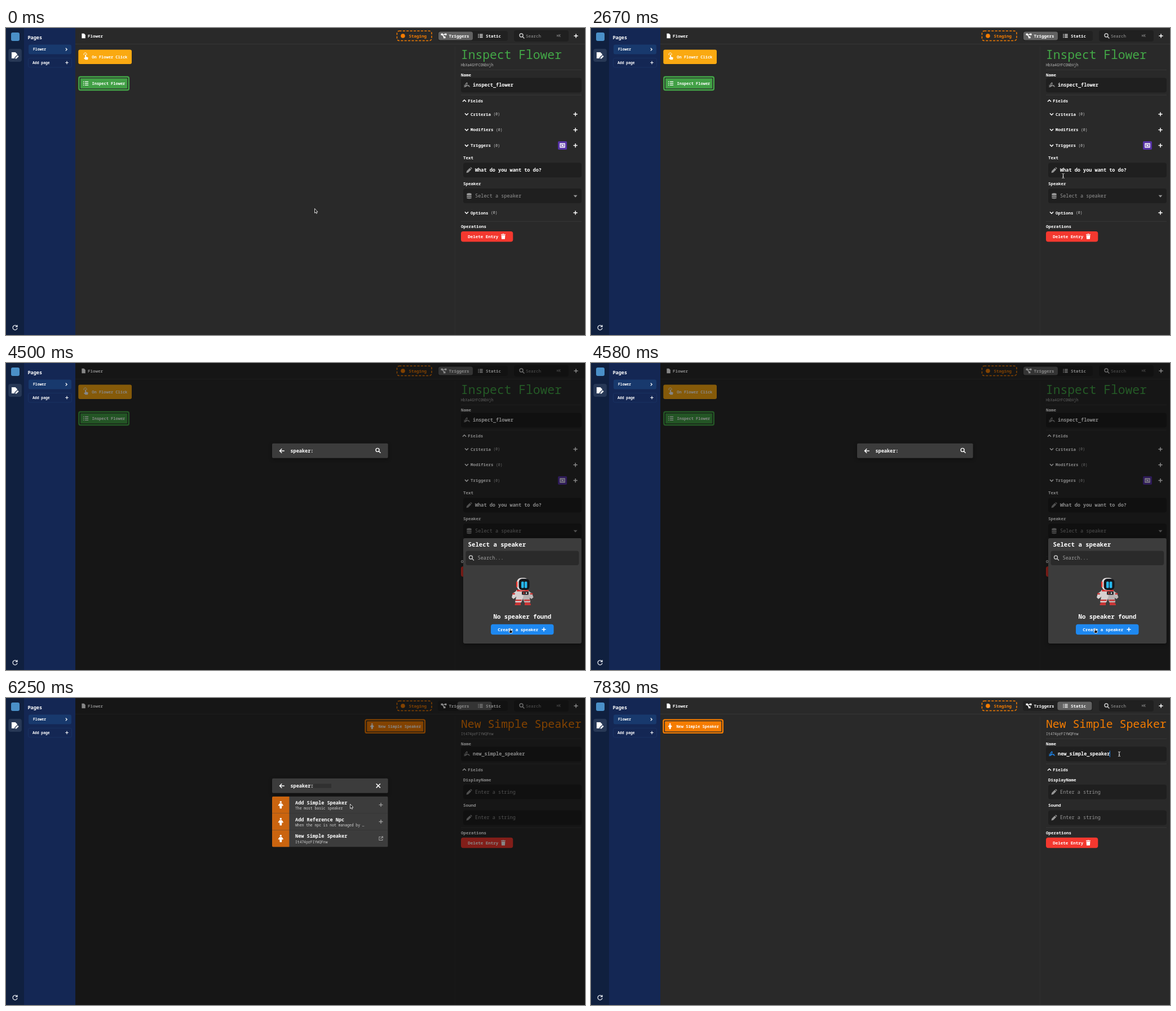
These frames come from a looping animation (1027 px wide and 545 px high, 8 s). An HTML page:

```html
<!DOCTYPE html>
<html lang="en">
<head>
<meta charset="utf-8">
<title>Entry editor</title>
<style>
html, body { margin: 0; width: 100%; height: 100%; overflow: hidden; background: #292929; }
svg { display: block; width: 100vw; height: 100vh; }
text { font-family: 'Noto Sans Mono', 'DejaVu Sans Mono', monospace; white-space: pre; }
.raised { filter: drop-shadow(0 2px 3px rgba(0,0,0,.4)); }
</style>
</head>
<body>
<svg id="stage" viewBox="0 0 1027 545" xmlns="http://www.w3.org/2000/svg"></svg>
<script>
const LOOP = 8000;
const WHITE = '#fff', GREY = '#969696', GREEN = '#43a847', ORANGE = '#f57c00',
      BLUE = '#1e88f0', RED = '#f4382f', FIELD = '#1f1f1f', RAISED = '#3c3c3c';

// Drawing helpers
const rect = (x, y, w, h, fill, r = 0, extra = '') =>
  `<rect x="${x}" y="${y}" width="${w}" height="${h}" rx="${r}" fill="${fill}" ${extra}/>`;
const circle = (x, y, r, fill) => `<circle cx="${x}" cy="${y}" r="${r}" fill="${fill}"/>`;
const shape = (d, fill) => `<path d="${d}" fill="${fill}"/>`;
const text = (s, x, y, size = 7.5, fill = WHITE, weight = 600) =>
  `<text x="${x}" y="${y}" font-size="${size}" fill="${fill}" font-weight="${weight}">${s}</text>`;
const group = (id, body, extra = '') => `<g id="${id}" ${extra}>${body}</g>`;
const rule = (y, x1 = 807, x2 = 1021) =>
  `<path d="M${x1} ${y}H${x2}" stroke="#3b3b3b" stroke-width=".8"/>`;

// Icons are centred on 0,0; numbers are stroke widths, 0 means filled
const ICONS = {
  plus: ['M-3.6 0H3.6M0-3.6V3.6', 1.5],
  right: ['M-1.2-2.4L1.2 0-1.2 2.4', 1.3],
  down: ['M-3-1.5L0 1.5 3-1.5', 1.5],
  up: ['M-3 1.5L0-1.5 3 1.5', 1.5],
  caret: ['M-3.4-1.7H3.4L0 2.2z', 0],
  list: ['M-4.6-3h1.6M-4.6 0h1.6M-4.6 3h1.6M-1.5-3H4.6M-1.5 0H4.6M-1.5 3H4.6', 1.4],
  search: ['M2-1A3 3 0 1 1-4-1 3 3 0 1 1 2-1M1.2 1.2L4.4 4.4', 1.4],
  close: ['M-3.6-3.6L3.6 3.6M3.6-3.6L-3.6 3.6', 1.5],
  back: ['M4.2 0H-4M-.3-3.8L-4.1 0-.3 3.8', 1.5],
  open: ['M-.5-3H-3.3V3.3H3V.5M.8-3.6H3.6V-.8M3.6-3.6L-.6.6', 1.1],
  refresh: ['M3.4-2A4 4 0 1 0 4 1M4-4.4V-1.3H.8', 1.3],
  squiggle: ['M-5.3 2.8Q-1 4 .2-1.5T-2.4-2Q-3 2.2.8 1T3.2.6 5.3 2.7M-5-.2L-2.8 2', 1.2],
  flow: ['M-5-4.3h3.6v1.2H1.4v-1.2H5v3.4H1.4v-1H-1.1L1 1h2v3.3H-.6V1.7L-2.7-.9H-5z', 0],
  file: ['M-3.2-4.2H.7L3.2-1.7V4.2H-3.2z', 0],
  edit: ['M-5.5-5H.5L3.5-2V-.6L-.8 3.6V5.2H-5.5zM.5 3.9L4.3.1 6 1.8 2.2 5.5H.5z', 0],
  trash: ['M-4.2-4.3H-1.6L-1-5H1L1.6-4.3H4.2V-3H-4.2zM-3.6-2.2H3.6L3.1 5H-3.1z', 0],
  pencil: ['M-5 5L-4.2 1.5 1-3.7 3.7-1-1.5 4.2zM1.8-4.4L2.6-5Q3.4-5.4 5 -3.4 5.4-2.6 4.4-1.8z', 0],
  db: ['M-4.2-3.2A4.2 1.8 0 0 1 4.2-3.2V-1.9A4.2 1.5 0 0 1-4.2-1.9zM-4.2-.9A4.2 1.5 0 0 0 4.2-.9V1.1A4.2 1.5 0 0 1-4.2 1.1zM-4.2 2.1A4.2 1.5 0 0 0 4.2 2.1V3.6A4.2 1.6 0 0 1-4.2 3.6z', 0],
  person: ['M-1.4-4.1a1.4 1.4 0 1 1 2.8 0 1.4 1.4 0 1 1-2.8 0M-1.6-2.3H1.6L3.8.8 2.7 1.6 1.8.7 1.3 5.2H-1.3L-1.8.7-2.7 1.6-3.8.8z', 0],
  touch: ['M-1.3 1V-3.4a.9.9 0 0 1 1.8 0V-.4L3.6.4Q4.4.7 4.2 1.6L3.5 4.8H-.8L-3.6 2 -3 1.4z', 0],
  ring: ['M-2.7-1.4A2.6 2.6 0 1 1 1.9-1.4', 1],
  image: ['M-4-3.2H4V3.2H-4zM-2.4-1.2H-.4M.4 1.2H2.4M-2 1.6L2-1.6', 1.5]
};
const icon = (name, x, y, color = WHITE, scale = 1) => {
  const [d, w] = ICONS[name];
  const paint = w ? `fill="none" stroke="${color}" stroke-width="${w}"` : `fill="${color}"`;
  return `<path d="${d}" transform="translate(${x} ${y}) scale(${scale})" ${paint}/>`;
};

// Repeated interface parts
const input = (x, y, glyph, value, color, weight, glyphColor = GREY) =>
  rect(x, y, 1021 - x, 26, FIELD, 4) + icon(glyph, x + 10.5, y + 13, glyphColor) +
  text(value, x + 21, y + 15.8, 8.55, color, weight);
const foldRow = (name, y) =>
  icon('down', 817, y) + text(name, 824, y + 2.6) +
  text('(0)', 824 + name.length * 4.5 + 4.5, y + 2.4, 6.4, '#c4c4c4', 400) + icon('plus', 1010, y);
const remove = y =>
  text('Operations', 807, y) + rect(807, y + 6, 92.3, 18.4, RED, 4) +
  text('Delete Entry', 819.3, y + 17.8) + icon('trash', 882, y + 15.1, WHITE, .95);
const heading = (name, size, id, color, y) =>
  text(name, 807, y, size, color, 400) + text(id, 807, y + 12.8, 6.4, '#bbb', 400) + rule(y + 19.3) +
  text('Name', 807, y + 31) + icon('up', 813, y + 74.3) + text('Fields', 819.3, y + 76.9) + rule(y + 64);
const selected = (x, y, w, color, inner) =>
  rect(x + 1.2, y + 1.2, w - 2.4, 23.3, 'none', 2.5, `stroke="${color}" stroke-width="2.4"`) +
  rect(x + 3.8, y + 3.8, w - 7.6, 18.2, inner, 1);
const result = (y, title, note, action) =>
  rect(472, y, 205.6, 30, RAISED) + rect(472, y, 30.4, 30, '#ca640f') +
  icon('person', 487.3, y + 15, WHITE, 1.25) + text(title, 513, y + 13.8, 8.55) +
  text(note, 513, y + 23, 6.4, '#d0d0d0', 500) + icon(action, 665, y + 14.8, '#9d9d9d', .95);

const sidebar =
  rect(0, 0, 32, 545, '#10203f') + rect(32, 0, 91, 545, '#142754') +
  rect(9, 8, 15, 15, '#4a90c8', 3) +
  rect(4.3, 37, 23.6, 23, '#273856', 4) + icon('edit', 16, 48.4, WHITE, 1.1) +
  icon('refresh', 16, 531.7, '#e4e8ef') +
  text('Pages', 38.4, 20.2, 8.55) +
  rect(40, 29.5, 76, 17, '#18396d', 3) + text('Flower', 48, 40.2, 6.4) + icon('right', 107, 38) +
  rect(39.5, 53.4, 77, 16.4, 'none', 3, 'stroke="#1c3566" stroke-width=".8"') +
  text('Add page', 47, 63.8, 6.4) + icon('plus', 108, 61.5, WHITE, .75);

const header =
  rule(28.5, 123, 1027) + '<path d="M796.5 33V545" stroke="#303030" stroke-width=".8"/>' +
  icon('file', 137.6, 14) + text('Flower', 145, 16.7) +
  rect(693.5, 5.3, 61.5, 17.2, 'none', 4, `stroke="${ORANGE}" stroke-width="1.5" stroke-dasharray="4 2.4"`) +
  circle(704, 14, 3.8, ORANGE) + text('Staging', 714.5, 16.7, 7.5, ORANGE) +
  rect(766, 5, 124, 18, '#212121', 4) + rect(767, 6.5, 61, 15, '#626262', 3.5, 'id="tab"') +
  icon('flow', 776.5, 14) + text('Triggers', 785.5, 16.7) +
  icon('list', 841.5, 14, WHITE, .9) + text('Static', 851, 16.7) +
  rect(901, 4, 97, 20, '#202020', 4) + icon('search', 915, 14, '#ccc') +
  text('Search', 922, 16.7, 7.5, '#9d9d9d', 400) + text('⌘K', 976.5, 16.3, 6.4, '#9d9d9d', 400) +
  icon('plus', 1011, 14);

const triggerNodes =
  rect(128.3, 38.5, 94.7, 25.6, '#faa911', 3) + icon('ring', 141, 49.3, WHITE) +
  icon('touch', 141.5, 51.5) + text('On Flower Click', 152.3, 54, 7) +
  selected(128.2, 85.5, 90.8, GREEN, '#42a046') + icon('list', 141.5, 98.4) +
  text('Inspect Flower', 152.5, 101, 7);
const staticNodes =
  selected(127.2, 37.4, 107.8, ORANGE, ORANGE) + icon('person', 140.2, 50.2, WHITE, .95) +
  text('New Simple Speaker', 151.4, 52.8, 7);

const triggerPanel =
  heading('Inspect Flower', 21.3, 'HbXa4GYFCONbVjh', GREEN, 55) +
  input(807, 88.5, 'squiggle', 'inspect_flower', WHITE, 600) +
  foldRow('Criteria', 153) + foldRow('Modifiers', 180.8) + foldRow('Triggers', 208.6) +
  rect(979, 201, 16, 15, '#5632a6', 2) + icon('image', 987, 208.5) +
  text('Text', 811, 233) + input(811, 239.2, 'pencil', 'What do you want to do?', WHITE, 600) +
  text('Speaker', 811, 278.8) + input(811, 285, 'db', 'Select a speaker', GREY, 400, 'currentColor') +
  icon('caret', 1010, 298.5, 'currentColor') + foldRow('Options', 328) + rule(343.3) + remove(355);
const staticPanel =
  heading('New Simple Speaker', 19.8, 'It474prFIYWQFnw', ORANGE, 53) +
  input(807, 86.5, 'squiggle', 'new_simple_speaker', WHITE, 600, 'currentColor') +
  rect(919.8, 93.6, 1, 11.4, BLUE, 0, 'id="insert"') +
  text('DisplayName', 811, 147.6) + input(811, 153.8, 'pencil', 'Enter a string', GREY, 400) +
  text('Sound', 811, 193.4) + input(811, 199.6, 'pencil', 'Enter a string', GREY, 400) +
  rule(230) + remove(241.8);

const robot =
  // arms, torso and legs
  shape('M906 404L899 409 897 416 900 419 904 416 907 411z', '#d9d3d3') +
  shape('M926 404L933 409 935.5 416 932 419 928 416 925 411z', '#bdb6b6') +
  rect(898, 408.5, 5, 2.4, '#c93636', 1) + rect(929.5, 408.5, 5, 2.4, '#c93636', 1) +
  shape('M905 403H927L928 415 930 425H919.5L917 418 914 425H903L905 415z', '#d6cfcf') +
  shape('M918 411H928L930 425H919.5L917 418z', '#b9b1b1') +
  shape('M904 420H915L914 422.4H903.4zM918.7 420H929L929.6 422.4H919z', '#c93636') +
  shape('M902.5 430Q902.5 425 907 425H913V430zM920 430V425H926Q931 425 931 430z', '#c93636') +
  // collar and chest
  rect(906, 402.5, 21, 3, '#d92f2f', 1) + rect(915, 405.5, 12, 6, '#26262a', 1) +
  circle(918.5, 408.5, 1.2, RED) + circle(923, 408.5, 1.2, WHITE) +
  // helmet
  rect(906, 381.5, 21, 22, '#e6e1e1', 8) + rect(905, 388, 2.4, 10, RED, 1) +
  rect(909.5, 383, 19, 20, '#15171c', 6) +
  rect(914, 388, 4.6, 11.5, '#25b7ef', 1.5) + rect(919.8, 388, 4.6, 11.5, '#25b7ef', 1.5);
const popup =
  rect(811, 311, 209.8, 187, RAISED, 3, 'class="raised"') +
  text('Select a speaker', 819.6, 326, 10.68) +
  rect(815.4, 333.6, 200.8, 25.4, '#2a2a2a', 4) + icon('search', 825.5, 346, '#c4c4c4') +
  text('Search...', 836.5, 349, 8.55, '#a0a0a0', 400) + robot +
  text('No speaker found', 864.6, 454, 10.68) +
  rect(860, 463.8, 111.5, 18.4, BLUE, 4) + text('Create a speaker', 872.3, 475.7) + icon('plus', 954, 473);

const dialog =
  rect(472, 142.8, 205.6, 26, RAISED, 2, 'class="raised"') + icon('back', 489.6, 156) +
  text('speaker:', 504.4, 158.8, 8.55) +
  group('lookup', icon('search', 660, 155.4)) +
  group('results',
    rect(545.5, 152.3, 31.5, 7.4, '#303030') + icon('close', 660.3, 155.8) +
    `<g clip-path="url(#rows)">` +
    result(174.8, 'Add Simple Speaker', 'The most basic speaker', 'plus') +
    result(204.7, 'Add Reference Npc', 'When the npc is not managed by …', 'plus') +
    group('created', result(234.6, 'New Simple Speaker', 'It474prFIYWQFnw', 'open')) + '</g>');

const outline = 'fill="#111" stroke="#fff" stroke-width=".8" stroke-linejoin="round"';
const cursor =
  `<path id="arrow" d="M0 0V8L1.8 6.4 3 9 4.3 8.4 3.1 5.9H5.4z" ${outline}/>` +
  `<path id="beam" d="M-2-4Q0-4 0-2.8 0-4 2-4M0-3V3M-2 4Q0 4 0 2.8 0 4 2 4M-1 .8H1" fill="none" stroke="#ddd" stroke-width="1"/>` +
  `<path id="hand" d="M-.8 0Q0-1 .8 0V3L3.4 3.7Q4.3 4 4.1 5L3.3 8H-.5L-2.8 4.7-2 4.2-.8 5.2z" ${outline}/>`;

const stage = document.getElementById('stage');
stage.innerHTML =
  `<defs><clipPath id="canvas"><rect x="123" y="29" width="673" height="516"/></clipPath>
   <clipPath id="rows"><rect id="rowsBox" x="472" y="174.8" width="205.6" height="89.8" rx="2.5"/></clipPath></defs>` +
  rect(0, 0, 1027, 545, '#292929') +
  `<g clip-path="url(#canvas)">${group('triggerNodes', triggerNodes)}${group('staticNodes', staticNodes)}</g>` +
  header + group('triggerPanel', triggerPanel) + group('staticPanel', staticPanel) +
  rect(123, 0, 904, 545, '#000', 0, 'id="shade"') +
  group('popup', popup) + group('dialog', dialog) + sidebar + group('cursor', cursor);

const el = {};
stage.querySelectorAll('[id]').forEach(n => el[n.id] = n);

// Timeline, in ms
const OPEN = 3100, CREATE = 4290, POPUP_END = 4700, RESULTS = 4950, ADD = 6170, CLOSE = 6260, FOCUS = 7600;
const PATH = [
  [0, 547.5, 320.5], [1750, 547.5, 320.5], [2550, 837.5, 262.5], [2700, 837.5, 262.5],
  [3030, 900, 299], [3250, 900, 299], [3600, 911.5, 348], [3720, 911.5, 348],
  [4130, 894.2, 471.5], [4650, 894.2, 471.5], [5500, 610.5, 188.3], [6720, 610.5, 188.3],
  [7500, 937, 99.5], [LOOP, 937, 99.5]
];
const ramp = (t, from, length) => Math.min(1, Math.max(0, (t - from) / length));
const ease = u => u * u * (3 - 2 * u);
const show = (node, on) => node.setAttribute('opacity', +on);

function pointer(t) {
  const i = PATH.findIndex(p => p[0] > t);
  const [t0, x0, y0] = PATH[i - 1], [t1, x1, y1] = PATH[i];
  const u = ease(ramp(t, t0, t1 - t0));
  return [x0 + (x1 - x0) * u, y0 + (y1 - y0) * u];
}

function pointerKind(t, x, y) {
  const over = (a, b, c, d) => x > a && x < c && y > b && y < d;
  if (t < OPEN + 100 || t >= CLOSE) {
    if (t < OPEN && over(811, 239, 1021, 265)) return 'beam';
    if (t >= CLOSE && over(807, 86, 1021, 112)) return 'beam';
    return t < CLOSE && over(811, 285, 1021, 311) ? 'hand' : 'arrow';
  }
  if (t < POPUP_END) {
    if (over(815, 333, 1016, 359)) return 'beam';
    return over(860, 464, 972, 482) || over(811, 285, 1021, 311) ? 'hand' : 'arrow';
  }
  return t < ADD && over(472, 175, 678, 235) ? 'hand' : 'arrow';
}

function draw(t) {
  const isStatic = t >= ADD;
  const slide = 673 * ease(ramp(t, ADD, 252));
  el.triggerNodes.setAttribute('transform', `translate(${-slide} 0)`);
  el.staticNodes.setAttribute('transform', `translate(${673 - slide} 0)`);
  el.tab.setAttribute('x', 767 + 60.4 * ease(ramp(t, ADD, 150)));
  show(el.triggerPanel, !isStatic);
  show(el.staticPanel, isStatic);
  el.triggerPanel.style.color = t >= OPEN && t < CREATE ? BLUE : GREY;
  el.staticPanel.style.color = t >= FOCUS ? BLUE : GREY;
  show(el.insert, t >= FOCUS);

  show(el.popup, ramp(t, OPEN, 120) * (1 - ramp(t, POPUP_END, 120)));
  const modal = ease(ramp(t, CREATE, 200)) * (1 - ease(ramp(t, CLOSE, 190)));
  show(el.shade, modal * .47);
  show(el.dialog, modal);
  show(el.lookup, t < RESULTS);
  show(el.results, ramp(t, RESULTS, 100));
  show(el.created, isStatic);
  el.rowsBox.setAttribute('height', isStatic ? 89.8 : 59.9);

  const [x, y] = pointer(t), kind = pointerKind(t, x, y);
  el.cursor.setAttribute('transform', `translate(${x} ${y})`);
  for (const k of ['arrow', 'beam', 'hand']) show(el[k], k === kind);
}

const start = performance.now();
function tick() {
  draw((performance.now() - start) % LOOP);
  requestAnimationFrame(tick);
}
tick();
</script>
</body>
</html>
```
